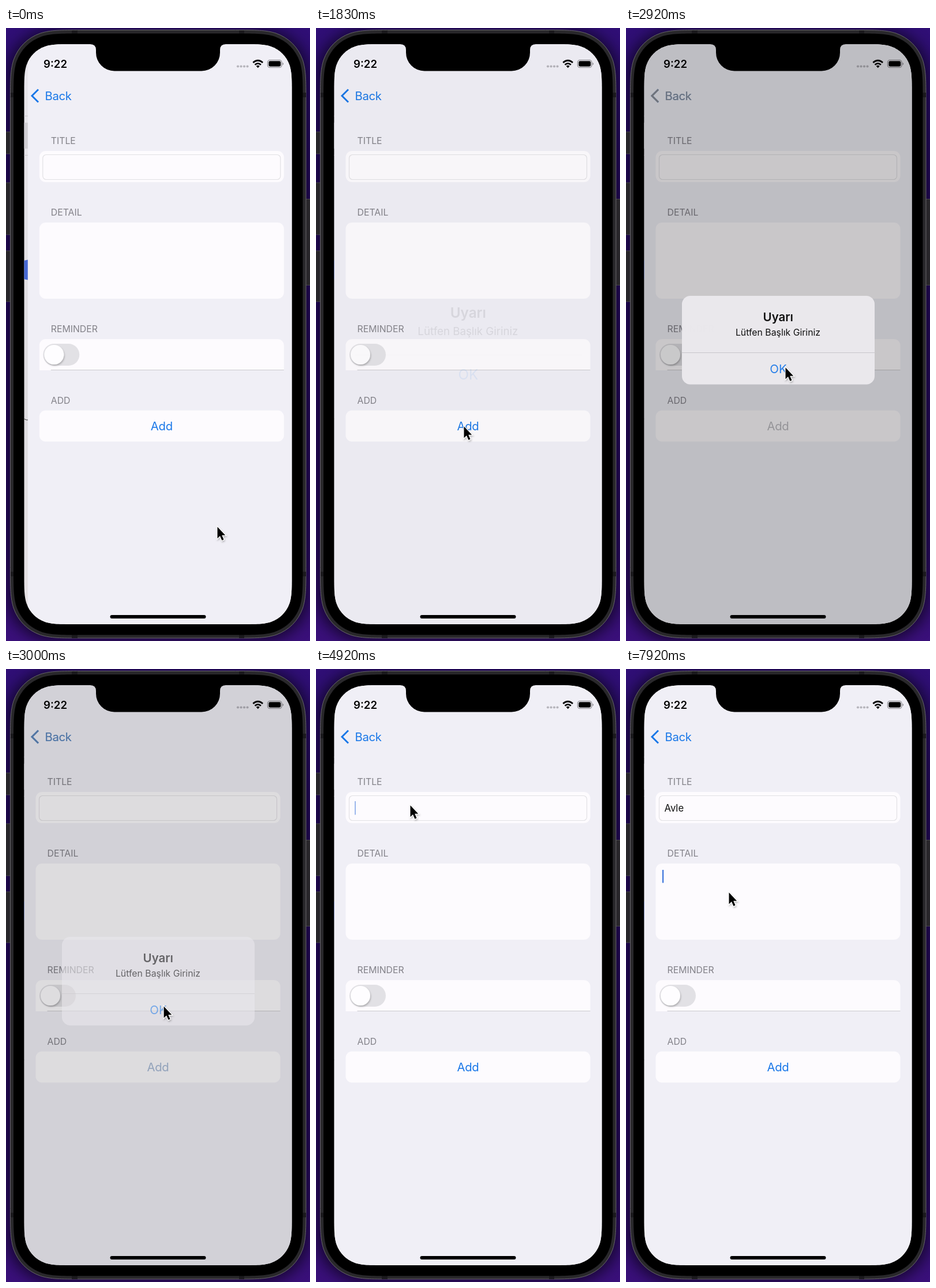
These frames come from a looping animation (527x1062 px, 8 s). An HTML page:

```html
<!DOCTYPE html>
<html lang="en">
<head>
<meta charset="utf-8">
<title>Reminder form</title>
<style>
html, body { margin: 0; width: 100%; height: 100%; overflow: hidden; background: #2b0c6e; }
svg { display: block; width: 527px; height: 1062px; }
text { font-family: Inter, "Liberation Sans", sans-serif; }
.head { font-size: 15.8px; fill: #838289; }
.card { fill: #fdfbfe; }
.nav { font-size: 20.3px; letter-spacing: -.3px; }
.mid { text-anchor: middle; }
.blue { fill: #1a78e8; }
.caret { fill: #3b74dc; }
</style>
</head>
<body>
<svg viewBox="0 0 527 1062">
  <defs>
    <linearGradient id="wall" x2="0" y2="1">
      <stop offset="0" stop-color="#300f76"/>
      <stop offset=".2" stop-color="#280b68"/>
      <stop offset=".8" stop-color="#2a0b68"/>
      <stop offset="1" stop-color="#3a107a"/>
    </linearGradient>
    <linearGradient id="under" x2="0" y2="1">
      <stop offset="0" stop-color="#e9e7ed"/>
      <stop offset=".6" stop-color="#dedce0"/>
      <stop offset="1" stop-color="#e6e2e5"/>
    </linearGradient>
    <clipPath id="screen"><path data-round="31.5 28 464 1005 56"/></clipPath>
    <filter id="soft" x="-50%" y="-50%" width="200%" height="200%">
      <feDropShadow dx="1" dy="2" stdDeviation="1.8" flood-opacity=".25"/>
    </filter>
    <filter id="blur" x="-20%" y="-20%" width="140%" height="140%">
      <feGaussianBlur stdDeviation="12"/>
    </filter>
  </defs>

  <rect width="527" height="1062" fill="url(#wall)"/>
  <rect x="2" y="2" width="523" height="1060" rx="80" opacity=".6" filter="url(#blur)"/>

  <!-- phone body -->
  <g fill="#28262a" stroke="#47454a">
    <rect x="-4" y="180" width="13" height="38"/>
    <rect x="-4" y="268" width="13" height="90"/>
    <rect x="-4" y="386" width="13" height="88"/>
    <rect x="518" y="296.500" width="13" height="149"/>
  </g>
  <path data-round="7.5 3.5 512.5 1053.5 80" fill="#29282b" stroke="#68666b"/>
  <g fill="#1b1a1d">
    <path d="M114 4h10v7h-10zM404 4h9v7h-9zM114 1050h10v7h-10zM404 1050h9v7h-9z"/>
    <path d="M8 112h6v8H8zM514 112h6v8h-6zM8 942h6v8H8zM514 942h6v8h-6z"/>
  </g>
  <path data-round="13 9.5 501.5 1042 75"/>

  <g clip-path="url(#screen)">
    <!-- page being covered -->
    <rect x="31" y="28" width="465" height="1005" fill="url(#under)"/>
    <path d="M31 152.500h30M31 220.500h30" stroke="#c9c7cc"/>
    <rect x="31" y="164" width="30" height="45" fill="#d0ced3"/>
    <path d="M31 403l9-2v36l-9-2z" fill="#4668d2"/>
    <path d="M31 677q4 3 9 2" fill="none" stroke="#333"/>

    <g id="page">
      <rect x="31.500" y="28" width="480" height="1005" fill="#f0eff6"/>
      <g class="head">
        <text x="71.500" y="200.500">TITLE</text>
        <text x="71.500" y="324.500">DETAIL</text>
        <text x="71.500" y="526.500">REMINDER</text>
        <text x="71.500" y="650.500">ADD</text>
      </g>
      <g class="card">
        <rect x="51.500" y="213" width="424" height="54" rx="11"/>
        <rect x="51.500" y="337" width="424" height="132" rx="11"/>
        <path d="M51.500 593v-43a11 11 0 0 1 11-11h402a11 11 0 0 1 11 11v43z"/>
        <rect x="51.500" y="662.500" width="424" height="54" rx="11"/>
      </g>
      <rect x="57.500" y="219.500" width="412" height="43" rx="6" fill="none" stroke="#e2e1e4" stroke-width="1.200"/>
      <path d="M71.500 592.500h404" stroke="#cbcace"/>
      <rect x="58" y="547" width="63" height="38" rx="19" fill="#e2e1e5"/>
      <circle cx="77" cy="566" r="17" fill="#fefdff" filter="url(#soft)"/>
      <text class="nav mid blue" x="263.500" y="697">Add</text>
      <text class="nav mid late" x="263.500" y="697" fill="#bbbabf">Add</text>
      <text id="title" x="66.500" y="246.800" font-size="16.700" fill="#111"></text>
      <rect id="titleCaret" class="caret" x="67" y="229" width="2" height="23.500"/>
      <rect id="detailCaret" class="caret" x="63" y="348" width="2.200" height="22.500"/>
    </g>

    <path d="M56 106.500L45 117.500L56 128.500" fill="none" stroke="#1a78e8" stroke-width="3"/>
    <text class="nav blue" x="67.500" y="124.800">Back</text>
    <g class="late">
      <path d="M56 106.500L45 117.500L56 128.500" fill="none" stroke="#949398" stroke-width="3"/>
      <text class="nav" x="67.500" y="124.800" fill="#949398">Back</text>
    </g>

    <!-- status bar -->
    <text x="65" y="68.800" font-size="18.600" font-weight="600">9:22</text>
    <g fill="#b6b5bc">
      <circle cx="402" cy="66.500" r="2.100"/><circle cx="407.500" cy="66.500" r="2.100"/>
      <circle cx="413" cy="66.500" r="2.100"/><circle cx="418.500" cy="66.500" r="2.100"/>
    </g>
    <g fill="none" stroke="#000" stroke-width="2.700">
      <path d="M428.300 60q8.400-7.500 16.800 0M431.500 63.700q5.200-4.600 10.400 0"/>
    </g>
    <path d="M433.700 66q3-2.400 6 0l-3 3.200z"/>
    <rect x="453.500" y="55.500" width="24.500" height="13" rx="4" fill="none" stroke="#86858a" stroke-width="1.200"/>
    <rect x="455.300" y="57.300" width="21" height="9.400" rx="2.400"/>
    <path d="M479.600 59.800q3 2.200 0 4.600z" fill="#86858a"/>

    <rect id="dim" x="31" y="28" width="465" height="1005"/>
    <rect x="180.500" y="1017" width="166" height="6" rx="3"/>

    <g id="alert">
      <rect class="late" x="97" y="464" width="334" height="153.500" rx="14.500" fill="#ebe9ed"/>
      <path d="M97 562.500h334" stroke="#c8c6cb" class="late"/>
      <g id="message" class="mid">
        <text x="263.800" y="508" font-size="20.500" font-weight="600">Uyarı</text>
        <text x="263.500" y="533" font-size="15.800">Lütfen Başlık Giriniz</text>
        <text x="264" y="598" font-size="20.500" class="blue">OK</text>
      </g>
    </g>
  </g>

  <path d="M146 27v1q10 0 10 10v4a32 32 0 0 0 32 32.500h151a32 32 0 0 0 32-32.500v-4q0-10 10-10v-1z"/>

  <g id="pointer" filter="url(#soft)">
    <path d="M0 0V20L4.500 15.700L7.900 23.400L11 22L7.700 14.500H13.700Z" stroke="#fff" stroke-width="2.400" paint-order="stroke"/>
  </g>
</svg>

<script>
const LOOP = 8000, FPS = 12;
const $ = id => document.getElementById(id);
const late = document.querySelectorAll('.late');
const addLabel = document.querySelector('#page .blue');

const ease = {
  line: u => u,
  in: u => u * u,
  out: u => 1 - (1 - u) ** 3,
  both: u => u * u * (3 - 2 * u)
};

// [time, x, y, easing towards this point]
const path = [
  [0, 366, 864], [250, 366, 864], [1350, 256, 690, 'both'],
  [2080, 256, 690], [2680, 276, 588, 'both'], [2920, 276, 588],
  [3083, 264, 572, 'in'], [4250, 163, 236, 'out'],
  [6500, 163, 236], [7250, 178, 387, 'both'], [LOOP, 178, 387]
];
// [time, alert visibility]
const shown = [
  [0, 0], [1750, 0], [1833, .08], [1917, .65], [2000, 1], [2833, 1],
  [2917, .93], [3000, .55], [3083, .14], [3167, .02], [3250, 0], [LOOP, 0]
];
const word = 'Avle';
const keys = [5500, 5750, 5920, 6170];
const TITLE_FOCUS = 4417, DETAIL_FOCUS = 7417;

// Rounded box whose corners ease gradually into the straight sides
function roundBox(x, y, w, h, r) {
  const turn = [[1.53, 0], [1.09, 0], [.87, 0], [.65, .07], [.37, .17],
                [.17, .37], [.07, .65], [0, .87], [0, 1.09], [0, 1.53]];
  const corner = (flipX, flipY) => {
    const pts = turn.map(([a, b]) =>
      `${flipX ? x + w - a * r : x + a * r} ${flipY ? y + h - b * r : y + b * r}`);
    return flipX === flipY ? pts : pts.reverse();
  };
  return 'M' + [[0, 0], [0, 1], [1, 1], [1, 0]]
    .map(c => corner(...c))
    .map(([start, ...rest]) => `${start}C${rest.join(' ')}`)
    .join('L') + 'Z';
}

function track(steps, t) {
  const i = Math.max(1, steps.findIndex(s => s[0] > t));
  const a = steps[i - 1], b = steps[i];
  const u = (ease[b[3]] || ease.line)((t - a[0]) / (b[0] - a[0]));
  return [1, 2].map(k => a[k] + (b[k] - a[k]) * u);
}

// On for half a second, off for half, with short fades
function blink(age) {
  const s = (age % 1000) / 1000;
  if (s < .55) return Math.min(1, (.55 - s) * 10);
  return Math.max(0, (s - .9) * 10);
}

function draw(t) {
  const [x, y] = track(path, t);
  $('pointer').setAttribute('transform', `translate(${x + .5} ${y + .3})`);

  const slide = t < 500 ? 6.3 * Math.exp(-t / 90) : 0;
  $('page').setAttribute('transform', `translate(${slide} 0)`);

  const [vis] = track(shown, t);
  const lateVis = ease.both(vis);
  const zoom = t < 2000 ? 1 + .2 * (1 - vis) : 1;
  $('dim').setAttribute('opacity', .225 * vis);
  $('message').setAttribute('opacity', vis);
  $('alert').setAttribute('transform', `translate(264 540.7) scale(${zoom}) translate(-264 -540.7)`);
  late.forEach(el => el.setAttribute('opacity', lateVis));
  addLabel.setAttribute('opacity', 1 - lateVis);

  const typed = keys.filter(k => k <= t);
  const title = $('title');
  title.textContent = word.slice(0, typed.length);
  const width = typed.length ? title.getComputedTextLength() : 0;
  const since = typed.length ? typed[typed.length - 1] : TITLE_FOCUS;
  const inTitle = t >= TITLE_FOCUS && t < DETAIL_FOCUS;
  $('titleCaret').setAttribute('x', 67 + width);
  $('titleCaret').setAttribute('opacity', inTitle ? blink(t - since) : 0);
  $('detailCaret').setAttribute('opacity', t >= DETAIL_FOCUS ? blink(t - DETAIL_FOCUS - 83) : 0);
}

function frame() {
  const t = performance.now() % LOOP;
  draw(Math.floor((t + 4) * FPS / 1000) * 1000 / FPS % LOOP);
  requestAnimationFrame(frame);
}

document.querySelectorAll('[data-round]').forEach(el =>
  el.setAttribute('d', roundBox(...el.dataset.round.split(' ').map(Number))));
frame();
</script>
</body>
</html>
```
